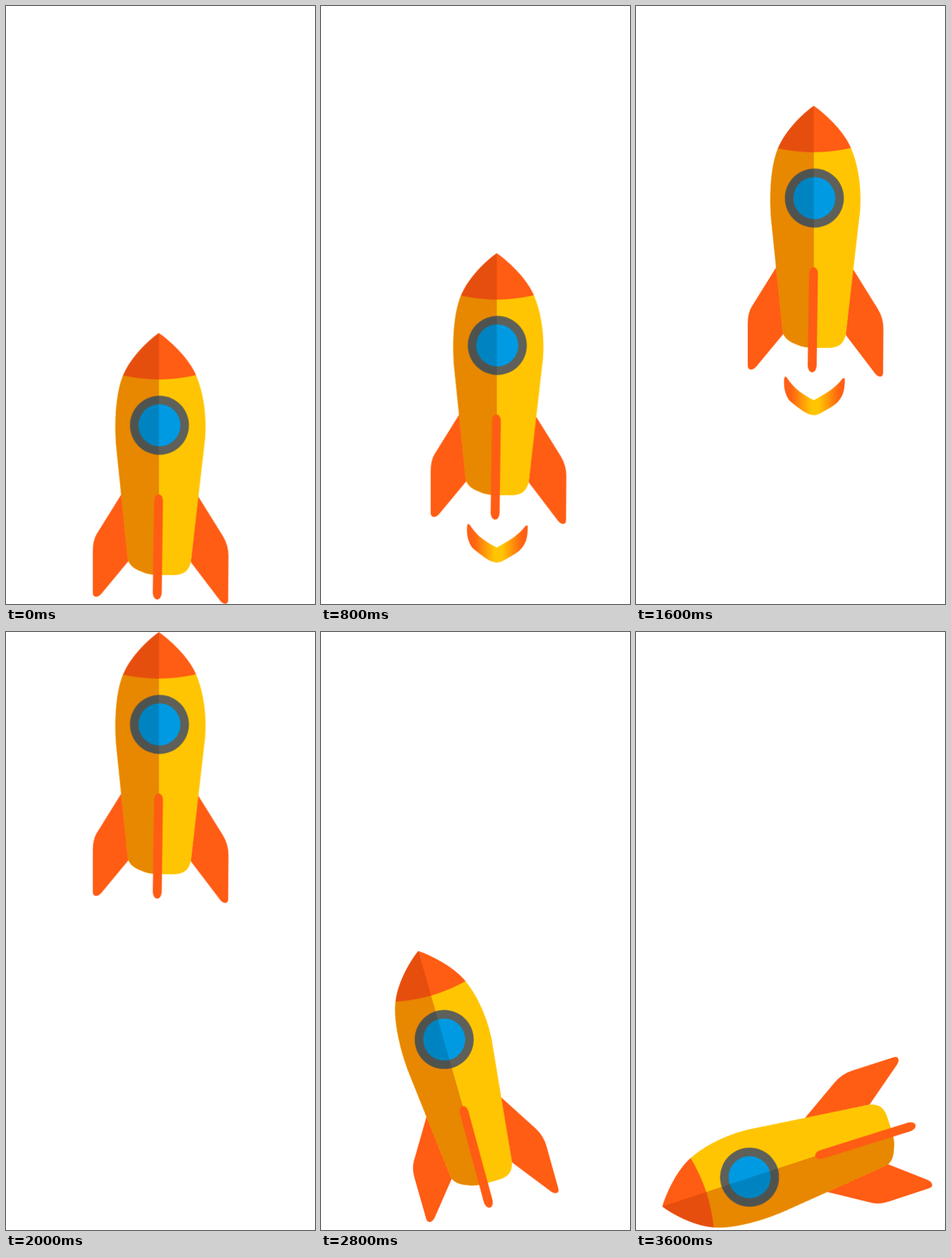
Animation of 500 by 966 pixels, one loop 5.6 s. Source, as an HTML page:

```html
<!DOCTYPE html>
<html lang="en">
<head>
<meta charset="utf-8">
<title>Rocket</title>
<style>
  html, body { margin: 0; width: 100%; height: 100%; overflow: hidden; background: #fff; }
  svg { display: block; width: 500px; height: 966px; }

  /* Every pose is held for 200 ms; the origin is the tip of the nose. */
  .rocket { transform-origin: 0 0; animation: fly 5600ms step-end infinite; }
  .near { opacity: 0; animation: near 5600ms step-end infinite; }
  .far { opacity: 0; animation: far 5600ms step-end infinite; }

  @keyframes fly {
    0%       { transform: translate(247.5px, 528.3px); }
    3.5714%  { transform: translate(211.5px, 483.3px); }
    7.1428%  { transform: translate(247.5px, 470.3px); }
    10.7142% { transform: translate(211.5px, 426.4px); }
    14.2857% { transform: translate(284.5px, 399.3px); }
    17.8571% { transform: translate(220.5px, 358.3px); }
    21.4285% { transform: translate(274.3px, 315.6px); }
    24.9999% { transform: translate(221.5px, 243.3px); }
    28.5714% { transform: translate(287.8px, 161.3px); }
    32.1428% { transform: translate(219.5px, 93.3px); }
    35.7142% { transform: translate(247.5px, 0.3px); }
    39.2857% { transform: translate(297.5px, 268.5px) rotate(13deg); }
    42.8571% { transform: translate(338.5px, 521px) rotate(25deg); }
    46.4285% { transform: translate(300px, 435.3px) rotate(4deg); }
    49.9999% { transform: translate(157.5px, 515.3px) rotate(-16deg); }
    53.5714% { transform: translate(13px, 552px) rotate(-35deg); }
    57.1428% { transform: translate(7.5px, 625px) rotate(-52deg); }
    60.7142% { transform: translate(38.3px, 793px) rotate(-80deg); }
    64.2857%, 100% { transform: translate(42.5px, 928px) rotate(-108.2deg); }
  }
  @keyframes near {
    0%, 17.8571%, 24.9999%, 32.1428%, 100% { opacity: 0; }
    14.2857%, 21.4285%, 28.5714% { opacity: 1; }
  }
  @keyframes far {
    0%, 24.9999%, 100% { opacity: 0; }
    21.4285% { opacity: 1; }
  }
</style>
</head>
<body>
<svg viewBox="0 0 500 966">
  <defs>
    <clipPath id="shade"><rect x="-120" y="-5" width="120" height="450"/></clipPath>
    <linearGradient id="fire">
      <stop offset="0" stop-color="#ff5c14"/>
      <stop offset=".12" stop-color="#ff6412"/>
      <stop offset=".45" stop-color="#ffc502"/>
      <stop offset=".58" stop-color="#ffc502"/>
      <stop offset=".9" stop-color="#ff6412"/>
      <stop offset="1" stop-color="#ff5c14"/>
    </linearGradient>
    <path id="hull" d="M-58 68 C-67 90 -70.5 121 -70.5 152 Q-70.5 170 -69 185 L-50.5 364
      C-49.5 372 -43 380 -29 385 Q-17 391 2 391 H22 C41 391 49 384 52 367 L72.5 189
      Q75.5 170 75.5 152 C75.5 121 70 91 60 68 Z"/>
    <path id="nose" d="M0 0 C24 17 50 44 60 68 Q0 81.7 -58 68.5 C-48 44 -24 17 0 0 Z"/>
    <path id="flame" fill="url(#fire)" d="M-46.5 437.5 C-49 438 -49 455 -46 463 Q-43 473 -38 477.5
      C-25 488 -16 495 -8 498 Q0 501.5 8 498 C20 491 33 485 39 478 C49 467 50 455 50 441
      Q49 438.5 46 441 C33 458 18 465 0 475.5 C-26 462 -34 453 -44 438.5 Q-45 437 -46.5 437.5 Z"/>
    <circle id="ring" cx=".8" cy="149" r="47.7"/>
    <circle id="glass" cx=".8" cy="149" r="34"/>
  </defs>

  <g class="rocket">
    <use class="near" href="#flame"/>
    <use class="far" href="#flame" y="62.5"/>
    <g fill="#ff5c14">
      <path d="M-60.5 260 L-101 325 Q-107 335 -107 352 V419 C-107 429 -98 427 -93 421 L-49 368 Z"/>
      <path d="M63 263 L103.5 328 Q112.5 343 112.5 360 L112 431 C112 440 104 438.500 99.500 433 L51.5 370 Z"/>
    </g>
    <use href="#hull" fill="#ffc502"/>
    <use href="#nose" fill="#ff5c14"/>
    <use href="#ring" fill="#5e6059"/>
    <use href="#glass" fill="#009ae2"/>
    <g clip-path="url(#shade)">
      <use href="#hull" fill="#e88700"/>
      <use href="#nose" fill="#e64e0e"/>
      <use href="#ring" fill="#4f534f"/>
      <use href="#glass" fill="#0084c1"/>
    </g>
    <path fill="#ff5c14" d="M-7.700 271 C-7 257 6 257 6.500 271 L4.500 420 C3 434 -8.500 434 -10 420 Z"/>
  </g>
</svg>
</body>
</html>
```
